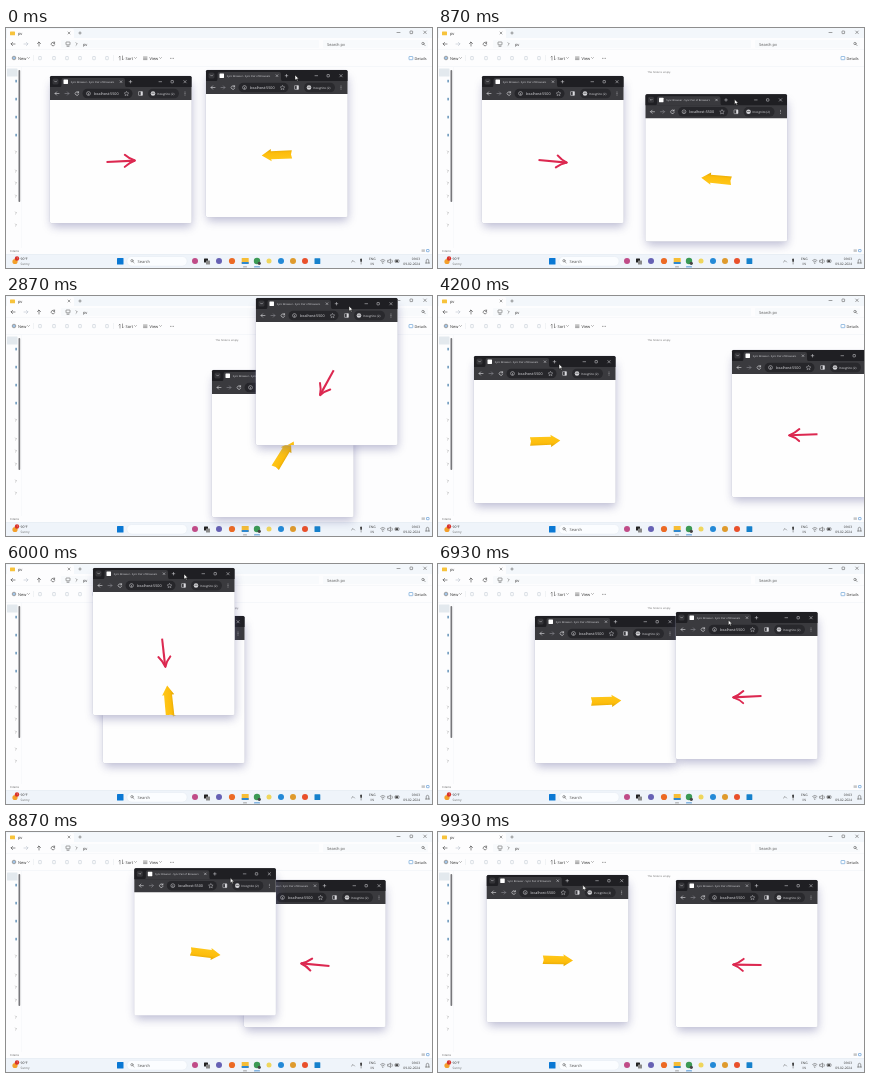
Recreate the animation shown at these times as an HTML page. Size 426 by 240 pixels, loop 9990 ms.

```html
<!DOCTYPE html>
<html lang="en">
<head>
<meta charset="utf-8">
<title>Two windows</title>
<style>
html, body { margin: 0; width: 100%; height: 100%; overflow: hidden; background: #fdfdfe; }
svg { display: block; width: 100vw; height: 100vh; }
text { font-family: "Open Sans", "Noto Sans", sans-serif; text-rendering: geometricPrecision; }
</style>
</head>
<body>
<svg id="stage" viewBox="0 0 426 240">
  <defs>
    <filter id="blur" x="-30%" y="-30%" width="160%" height="160%"><feGaussianBlur stdDeviation="5"/></filter>
    <linearGradient id="gold" x1="0" y1="0" x2="0" y2="1">
      <stop offset="0" stop-color="#ffc91c"/><stop offset=".65" stop-color="#fdbd0c"/><stop offset="1" stop-color="#dda203"/>
    </linearGradient>
    <clipPath id="page"><path d="M0 24H141.5V145.5Q141.5 147 140 147H1.500Q0 147 0 145.500Z"/></clipPath>
    <g id="red">
      <path d="M-14.500 -.5 L14 -1 L14 1.200 L-14.500 1.500Z" fill="#dc2850"/>
      <path d="M4 -6 Q8 -2 14 0 Q8 2 3.500 6" fill="none" stroke="#dc2850" stroke-width="2" stroke-linecap="round" stroke-linejoin="round"/>
    </g>
    <path id="yellow" d="M-15 -4.200 L6 -4 L5.500 -6 L15.300 0 L6 6.200 L6 4 L-15 4.300 L-14 0Z" fill="url(#gold)"/>
  </defs>
  <g id="desk"></g>
  <g id="wins"></g>
  <path id="cursor" d="M0 0V5.200L1.300 4.100L2.200 6L3 5.600L2.200 3.800H3.800Z" fill="#fff" stroke="#111" stroke-width=".5"/>
</svg>
<script>
const $ = id => document.getElementById(id);
const LOOP = 9990, FPS = 15, CX = 71, CY = 85, LAG = 60;

// markup helpers
const rect = (x, y, w, h, fill, r = 0, more = '') =>
  `<rect x="${x}" y="${y}" width="${w}" height="${h}" rx="${r}" fill="${fill}" ${more}/>`;
const disc = (x, y, r, fill) => `<circle cx="${x}" cy="${y}" r="${r}" fill="${fill}"/>`;
const line = (d, color, w = .6) =>
  `<path d="${d}" fill="none" stroke="${color}" stroke-width="${w}" stroke-linecap="round"/>`;
const text = (x, y, s, size, fill = '#333', more = '') =>
  `<text x="${x}" y="${y}" font-size="${size}" fill="${fill}" ${more}>${s}</text>`;
const cross = (x, y, r, c) => line(`M${x - r} ${y - r}l${2 * r} ${2 * r}m0 ${-2 * r}l${-2 * r} ${2 * r}`, c, .5);
const plus = (x, y, r, c) => line(`M${x - r} ${y}h${2 * r}M${x} ${y - r}v${2 * r}`, c, .5);
const box = (x, y, w, h, c) => rect(x, y, w, h, 'none', .4, `stroke="${c}" stroke-width=".5"`);
const back = (x, y, c) => line(`M${x + 2} ${y}h-4l1.600 -1.600m-1.600 1.600l1.600 1.600`, c);
const next = (x, y, c) => line(`M${x - 2} ${y}h4l-1.600 -1.600m1.600 1.600l-1.600 1.600`, c);
const reload = (x, y, c) => line(`M${x + 1.6} ${y - .8}a1.800 1.800 0 1 0 .1 1.500M${x + 1.6} ${y - 2}v1.300h-1.300`, c);
const lens = (x, y, c) => line(`M${x + .9} ${y + .9}l1.200 1.200M${x + 1.2} ${y}a1.200 1.200 0 1 0 -2.400 0a1.200 1.200 0 1 0 2.400 0`, c, .5);
const dots = (x, y, dx, dy, c) => [-1, 0, 1].map(i => disc(x + i * dx, y + i * dy, .45, c)).join('');

function desk() {
  const ink = '#444', pale = '#b9c2cc';
  let s = rect(0, 0, 426, 240, '#fdfdfe') + rect(0, 0, 426, 10, '#f3f7fb') + rect(1, 1, 67, 10, '#fdfdfe', 1.5);
  // tab and caption buttons
  s += rect(4, 3.5, 5, 3.800, '#f7c33c', .6) + text(12, 6.7, 'pv', 4) + cross(63, 5, 1, ink) + plus(74, 5, 1.2, ink);
  s += line('M391 4.500h3', ink, .5) + box(404, 3, 2.600, 2.600, ink) + cross(419, 4.300, 1.300, ink);
  // address row
  s += back(7, 16, ink) + next(20, 16, pale) + line('M33 18v-4l-1.600 1.600m1.600 -1.600l1.600 1.600', ink) + reload(47, 16, ink);
  s += rect(55, 12, 258, 8, '#f8fafc', 1) + rect(317, 12, 105, 8, '#f8fafc', 1);
  s += box(60, 14, 4, 2.800, ink) + line('M61 18.200h2', ink) + line('M70 14.700l1.300 1.300l-1.300 1.300', ink, .5);
  s += text(77, 17.500, 'pv', 4) + text(321, 17.500, 'Search pv', 4, '#555') + lens(417, 15.500, ink);
  s += rect(0, 21.500, 426, .4, '#eceff3');
  // command row
  s += `<circle cx="8" cy="30" r="1.800" fill="none" stroke="#444" stroke-width=".5"/>` + plus(8, 30, .9, '#2878c8');
  s += text(12, 31.500, 'New', 4) + line('M21.500 29.500l1 1l1 -1', ink, .4);
  [34, 48, 61, 74, 88, 101].forEach(x => s += box(x - 1.3, 28.500, 2.600, 3.200, pale));
  s += rect(27, 27, .4, 6, '#dde2e8') + rect(107, 27, .4, 6, '#dde2e8');
  s += line('M114 32v-4l-1 1m3.500 -1v4l1 -1', ink, .5) + text(119.500, 31.500, 'Sort', 4);
  s += line('M128.500 29.500l1 1l1 -1', ink, .4);
  s += line('M137.500 29h3.500m-3.500 1.300h3.500m-3.500 1.300h3.500', ink, .5) + text(143.500, 31.500, 'View', 4);
  s += line('M153.500 29.500l1 1l1 -1', ink, .4) + dots(166, 30.300, 1.5, 0, ink);
  s += box(403, 28.500, 3.800, 3.200, '#3a85c8') + text(408.500, 31.500, 'Details', 3.8);
  s += rect(0, 38, 426, .4, '#e9edf1');
  // side pane
  s += rect(1, 40.500, 10.500, 8, '#e3e9ee', .6);
  [53, 71, 89, 107].forEach(y => s += rect(9.500, y - 1.2, 1.2, 2.600, '#3e79a8'));
  [124, 143, 155, 168, 185, 197].forEach(y => s += line(`M9.500 ${y - 1}l1 1l-1 1`, '#777', .45));
  s += rect(12.500, 42, 1.700, 132, '#77777b', .8) + rect(15.200, 39, .3, 181, '#edf0f3');
  s += text(209.500, 44.800, 'This folder is empty.', 2.5, '#666');
  s += text(4, 224.200, '0 items', 2.7, '#555') + line('M416 222h2.500m-2.500 1.200h2.500', ink, .4) + box(420.500, 221.500, 2.600, 2.200, '#2878c8');
  // taskbar
  s += rect(0, 226, 426, 14, '#eff4fa') + rect(0, 226, 426, .4, '#dde5ee');
  s += disc(9, 233.500, 2.600, '#f3a02c') + disc(11, 230.500, 2.200, '#d8312a') + text(10.500, 231.400, '1', 2.5, '#fff');
  s += text(14.500, 232, '90°F', 3.4) + text(14.500, 237, 'Sunny', 3.1, '#666');
  s += rect(111, 230, 6.500, 6.500, '#0a78d4', .6);
  s += rect(121, 228.500, 60, 9.500, '#fbfdff', 4.5, 'stroke="#dfe5ec" stroke-width=".4"');
  s += `<g id="find">${lens(126, 232.700, ink)}${text(131.500, 234.700, 'Search', 4, '#555')}</g>`;
  s += disc(189, 233, 3, '#c04c88');
  s += rect(198, 230.500, 4, 4, '#222', .5) + rect(200, 232.500, 4, 4, '#8a8a8a', .5);
  s += disc(213, 233, 3, '#6661b4') + disc(226, 233, 3.100, '#ec6a24');
  s += rect(235.700, 230, 7, 6, '#f6bd35', .6) + rect(235.700, 234, 7, 2, '#2f88cf', .4);
  s += disc(251, 233, 3.200, '#3b9a55') + disc(253.300, 235.300, 1.600, '#444');
  s += disc(263, 233, 2.500, '#efd65c') + disc(275, 233, 3, '#2389d7') + disc(287, 233, 3, '#df9a2c');
  s += disc(299, 233, 3, '#e9502b') + rect(308.500, 230.200, 5.800, 5.800, '#1681cc', .6);
  s += rect(237, 238.600, 4, .7, '#888', .3) + rect(248, 238.600, 6, .7, '#1874c8', .3);
  // tray
  s += line('M345.500 234l1.500 -1.500l1.500 1.500', ink, .5) + rect(354.300, 230.500, 1.600, 3.500, '#333', .8) + line('M355.100 234.500v1.500', ink, .5);
  s += text(363, 232.200, 'ENG', 3.2) + text(364.500, 237, 'IN', 3.2);
  s += line('M374.600 232.300q2.200 -2 4.400 0m-3.500 1.300q1.300 -1.200 2.600 0', ink, .5) + disc(376.800, 235, .6, ink);
  s += line('M382 232.300h1l1.500 -1.300v4.500l-1.500 -1.300h-1zM386 232q1 1.200 0 2.500', ink, .5);
  s += box(389, 231.800, 4, 2.600, ink) + rect(389.500, 232.200, 2.500, 1.800, ink);
  s += text(414, 232.200, '09:03', 3.2, '#333', 'text-anchor="end"') + text(414, 237, '09-02-2024', 3.2, '#333', 'text-anchor="end"');
  s += line('M419.500 235h4m-3.300 0v-2.200a1.300 1.500 0 0 1 2.600 0v2.200', ink, .5);
  return s;
}

function win(id) {
  const w = '#dcdce0', g = '#8c8c92';
  return `<g id="${id}">` +
    rect(1, 7, 141, 144, '#50508c', 4, 'opacity=".36" filter="url(#blur)"') +
    rect(-.2, -.2, 141.900, 147.400, '#c9cbd6', 1.8) +
    rect(0, 0, 141.500, 147, '#fefefe', 1.5) +
    `<path d="M0 24V1.500Q0 0 1.500 0H140Q141.500 0 141.500 1.500V24Z" fill="#3a3a3e"/>` +
    `<path d="M0 11V1.500Q0 0 1.500 0H140Q141.500 0 141.500 1.500V11Z" fill="#1f1f23"/>` +
    rect(2.500, 2.500, 6, 6, '#343438', 1.5) + line('M4.500 5l1.100 1.100l1.100 -1.100', w, .5) +
    `<path d="M10 11.200Q11.500 11 11.500 9V4Q11.500 2 13.500 2H73Q75 2 75 4V9Q75 11 76.500 11.200Z" fill="#3a3a3e"/>` +
    rect(13.500, 3.500, 4.500, 4.500, '#fff', .4) +
    text(20.800, 6.800, 'Sync Browser - Sync Pair of Browsers', 2.55, w) +
    cross(71, 5.700, .9, w) + plus(80.500, 5.700, 1.300, w) +
    line('M109 5.700h2.600', w, .5) + box(121, 4.500, 2.400, 2.400, w) + cross(135, 5.700, 1.200, w) +
    back(7, 17.500, w) + next(17, 17.500, g) + reload(27, 17.500, w) +
    rect(32.500, 12.800, 50, 9.500, '#26262a', 4.7) +
    `<circle cx="38.500" cy="17.500" r="1.900" fill="none" stroke="${w}" stroke-width=".5"/>` + line('M38.500 17.300v1.200', w, .5) +
    text(43.700, 19, 'localhost:5500', 3.7, '#e6e6ea') +
    `<path d="M76.500 15.300l.7 1.500l1.600 .2l-1.200 1.100l.3 1.600l-1.400 -.8l-1.400 .8l.3 -1.600l-1.200 -1.100l1.600 -.2z" fill="none" stroke="${w}" stroke-width=".4"/>` +
    box(88.500, 15.600, 4, 3.800, w) + rect(90.700, 15.600, 1.800, 3.800, w) +
    rect(98, 12.800, 31, 9.500, '#29292d', 4.7) + disc(103, 17.500, 2.300, '#d4d4d8') +
    line('M101.800 17.200h2.400', '#333', .6) + text(107, 18.700, 'Incognito (2)', 3, '#e6e6ea') +
    dots(135, 17.500, 0, 1.5, w) +
    `<g clip-path="url(#page)"><use id="${id}red" href="#red"/><use id="${id}yellow" href="#yellow"/></g></g>`;
}

$('desk').innerHTML = desk();
$('wins').innerHTML = win('a') + win('b');

// drag paths: time, x, y
const paths = {
  a: [[0, 44, 48], [1950, 44, 48], [2350, 128, 34], [2667, 232, 6], [2867, 250, 2], [3000, 258, 8], [3250, 294, 54], [5150, 294, 54],
      [5500, 208, 28], [5800, 113, 8], [6000, 87, 4], [6250, 70, 4], [6500, 140, 24], [6850, 238, 48], [9990, 238, 48]],
  b: [[0, 200, 42], [500, 204, 54], [1000, 208, 70], [1350, 206, 74], [3450, 206, 74], [3800, 115, 66], [4067, 46, 61], [4200, 36, 60],
      [4450, 50, 56], [4850, 97, 52], [7050, 97, 52], [7350, 210, 66], [7600, 285, 60], [7867, 254, 41], [8200, 214, 30],
      [8700, 150, 34], [9300, 76, 42], [9750, 50, 43], [9990, 49, 43]]
};

// smooth curve through the keys, with flat tangents at turns and stops
function at(keys, t) {
  let i = 0;
  while (i < keys.length - 2 && t >= keys[i + 1][0]) i++;
  const p = keys[i], q = keys[i + 1], o = keys[i - 1], n = keys[i + 2], h = q[0] - p[0];
  const u = Math.min(1, Math.max(0, (t - p[0]) / h));
  const slope = (l, m, r, k) =>
    l && r && (m[k] - l[k]) * (r[k] - m[k]) > 0 ? (r[k] - l[k]) / (r[0] - l[0]) : 0;
  return [1, 2].map(k => {
    const v = slope(o, p, q, k) * h, w = slope(p, q, n, k) * h, d = q[k] - p[k];
    return p[k] + u * (v + u * (3 * d - 2 * v - w + u * (v + w - 2 * d)));
  });
}

// pointer anchors: time, window it holds (or none), offset
const holds = [[0, 'b', 89, 5], [1400, 'b', 89, 5], [1800, '', 166, 31], [1950, 'a', 93, 8], [3260, 'a', 93, 8],
  [3440, 'b', 85, 8], [4900, 'b', 85, 8], [5140, 'a', 91, 6], [6870, 'a', 91, 6], [7050, 'b', 96, 9], [9990, 'b', 96, 10]];

function pointer(t, pos) {
  let i = 0;
  while (i < holds.length - 2 && t >= holds[i + 1][0]) i++;
  const [p, q] = [holds[i], holds[i + 1]];
  const u = (t - p[0]) / (q[0] - p[0]), e = u * u * (3 - 2 * u);
  const spot = ([, w, x, y]) => w ? [pos[w][0] + x, pos[w][1] + y] : [x, y];
  const s = spot(p), r = spot(q);
  return s.map((v, k) => v + (r[k] - v) * e);
}

const place = (id, x, y, deg = 0) =>
  $(id).setAttribute('transform', `translate(${x.toFixed(2)} ${y.toFixed(2)}) rotate(${deg.toFixed(2)})`);

const arrow = { a: 'red', b: 'yellow' };
let front = 'b';

function draw(ms) {
  const t = Math.floor((ms % LOOP + 5) * FPS / 1000) * 1000 / FPS;
  const pos = { a: at(paths.a, t), b: at(paths.b, t) };
  for (const me of ['a', 'b']) {
    const other = me === 'a' ? 'b' : 'a';
    const old = at(paths[me], Math.max(0, t - LAG));
    // a dragged window still sees its neighbour where it was a moment ago
    const dx = pos[other][0] - old[0] + 2 * 0 + (pos[me][0] - old[0]) * 0;
    const gap = [pos[other][0] - pos[me][0] + pos[me][0] - old[0], pos[other][1] - old[1]];
    const see = gap.map((g, k) => pos[other][k] - pos[me][k] + (pos[me][k] - old[k]));
    const deg = Math.atan2(see[1], see[0]) * 180 / Math.PI;
    place(me, ...pos[me]);
    place(me + arrow[me], CX, CY, deg);
    place(me + arrow[other], CX + see[0], CY + see[1], deg + 180);
  }
  const top = t >= 1950 && t < 3440 || t >= 5140 && t < 7050 ? 'a' : 'b';
  if (top !== front) $('wins').appendChild($(front = top));
  $('find').style.display = t % 5000 > 2400 && t % 5000 < 3300 ? 'none' : '';
  place('cursor', ...pointer(t, pos));
}

const start = performance.now();
(function tick() {
  draw(performance.now() - start);
  requestAnimationFrame(tick);
})();
</script>
</body>
</html>
```
